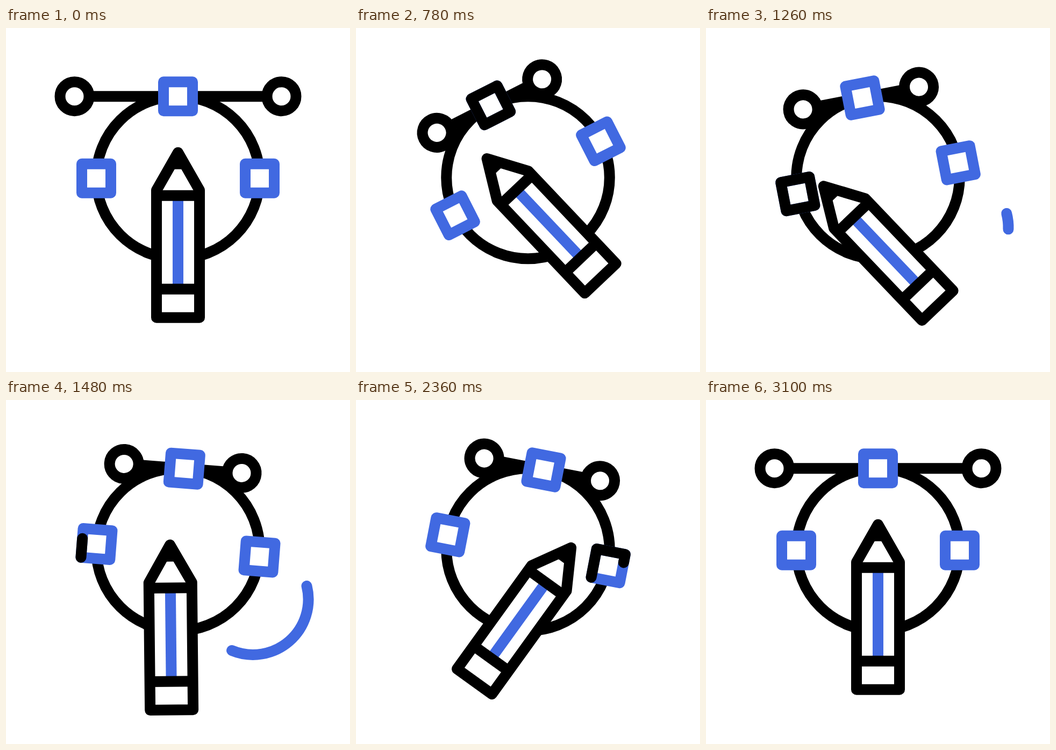
An HTML page for the animation above (3220 ms loop, 640x640 px).

```html
<!DOCTYPE html>
<html lang="en">
<head>
<meta charset="utf-8">
<title>Vector drawing icon</title>
<style>
html, body { margin: 0; height: 100%; overflow: hidden; background: #fff; }
svg { display: block; width: 100vw; height: 100vh; }
svg * { stroke-linejoin: round; }
.ink { fill: #fff; stroke: #000; stroke-width: 20; }
.blue { fill: #fff; stroke: #4169e1; stroke-width: 20; }
.trim { fill: none; stroke-linecap: round; visibility: hidden; }
</style>
</head>
<body>
<svg viewBox="0 0 640 640">
  <defs><path id="box" d="M-27 27H27V-27H-27Z"/></defs>
  <path id="arcLeft" class="blue trim" d="M124.6 417.8A105 105 0 0 0 264.3 542.8"/>
  <path id="arcRight" class="blue trim" d="M559.2 344.9A103 103 0 0 1 420.1 466"/>
  <ellipse class="ink" cx="320" cy="278.2" rx="151.8" ry="151"/>
  <g id="shape">
    <path id="bar" class="ink"/>
    <circle id="knobLeft" class="ink" cy="-152.5" r="27"/>
    <circle id="knobRight" class="ink" cy="-152.5" r="27"/>
    <g transform="translate(0 -152.5)">
      <use href="#box" class="blue"/>
      <path id="top" class="ink trim" d="M-27 27H27V-27H-27V27"/>
    </g>
    <g transform="translate(-152 0)">
      <use href="#box" class="blue"/>
      <path id="left" class="ink trim" d="M-27 27H27V-27H-27V27"/>
    </g>
    <g transform="translate(152 0)">
      <use href="#box" class="blue"/>
      <path id="right" class="ink trim" d="M-27 27H27V-27H-27V27"/>
    </g>
    <!-- pencil, with its tip at 0,0 -->
    <g id="pencil">
      <path class="ink" d="M0 0L40 70V307H-40V70Z"/>
      <path class="blue" d="M0 80V254"/>
      <path class="ink" d="M-10 21H10M-40 80H40M-40 254H40"/>
    </g>
  </g>
</svg>
<script>
const LOOP = 3220;
const $ = id => document.getElementById(id);

function ease(t, from, to) {
  const u = Math.min(1, Math.max(0, (t - from) / (to - from)));
  return u * u * (3 - 2 * u);
}

// Draws a path from its start, then erases it from its start.
function trim(id, t, start, duration) {
  const el = $(id), mid = start + duration, end = mid + duration;
  const length = el.getTotalLength();
  const tail = length * ease(t, mid, end);
  const head = length * ease(t, start, mid);
  el.style.visibility = t > start && t < end ? 'visible' : 'hidden';
  el.style.strokeDasharray = `${head - tail} ${2 * length}`;
  el.style.strokeDashoffset = -tail;
}

function draw(t) {
  const angle = -27.8 * ease(t, 220, 845) + 51.6 * ease(t, 845, 1934) - 23.8 * ease(t, 1934, 2745);
  $('shape').setAttribute('transform', `translate(320 279.7) rotate(${angle})`);

  const pull = ease(t, 220, 597) - ease(t, 2400, 2780);
  const x1 = -192.5 + 80 * pull, x2 = 192.5 - 85.5 * pull;
  $('knobLeft').setAttribute('cx', x1);
  $('knobRight').setAttribute('cx', x2);
  $('bar').setAttribute('d', `M${x1} -152.5H${x2}`);

  const rise = ease(t, 220, 505), toLeft = ease(t, 628, 975);
  const toRight = ease(t, 1110, 1920), home = ease(t, 2060, 2780);
  const side = -toLeft + 2 * toRight - home;
  const y = -48 - 64.5 * rise + 109.5 * toLeft - 24 * toRight * (1 - toRight) - 45 * home;
  $('pencil').setAttribute('transform', `translate(${125 * side} ${y}) rotate(${40 * side})`);

  trim('top', t, 515, 290);
  trim('left', t, 975, 290);
  trim('right', t, 1940, 290);
  trim('arcLeft', t, 220, 250);
  trim('arcRight', t, 1200, 270);
}

function frame() {
  draw(performance.now() % LOOP);
  requestAnimationFrame(frame);
}
frame();
</script>
</body>
</html>
```
